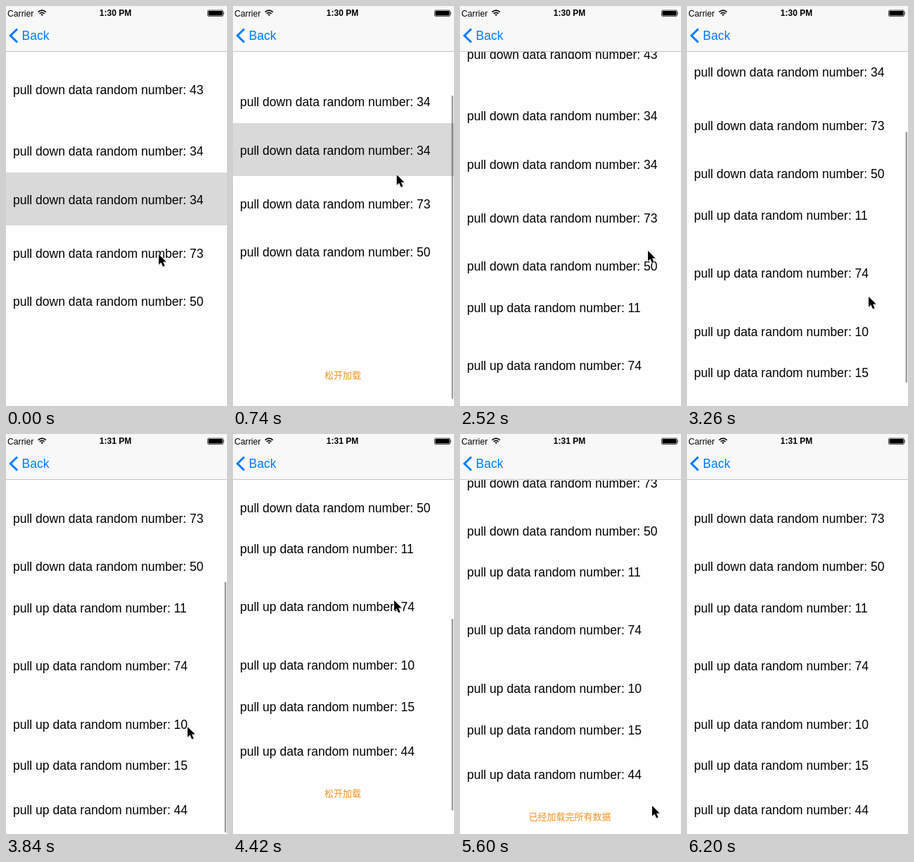
Animation of 314x567 px, one loop 7000 ms. Source, as an HTML page:

```html
<!DOCTYPE html>
<html lang="en">
<head>
<meta charset="utf-8">
<title>Pull to load</title>
<style>
  html, body { margin: 0; width: 100%; height: 100%; overflow: hidden; background: #fefefe; }
  svg { display: block; width: 314px; height: 567px; }
  text { font-family: "Liberation Sans", Arial, sans-serif; font-size: 17.5px; }
  .status { font-size: 12.2px; }
  #clock { font-size: 12px; font-weight: bold; text-anchor: middle; }
  #label { font: 13px "Noto Sans CJK SC", "Noto Sans CJK", sans-serif; fill: #f7931e; text-anchor: middle; }
</style>
</head>
<body>
<svg viewBox="0 0 314 567">
  <g id="list">
    <rect id="selected" y="236" width="314" height="75" fill="#d9d9d9"/>
    <g id="rows"></g>
    <g id="footer">
      <text id="label" x="156" y="5"></text>
      <circle id="spinner" cx="156" cy="0" r="9" fill="none" stroke="#f7931e" stroke-width="1.4" stroke-dasharray="49 8"/>
    </g>
  </g>
  <rect id="bar" x="310.5" width="2.5" rx="1.25" fill="#000" fill-opacity=".38"/>

  <rect width="314" height="64" fill="#f8f8f8"/>
  <rect y="64" width="314" height="1" fill="#c4c4c4"/>
  <text class="status" x="2" y="14.5">Carrier</text>
  <g fill="none" stroke="#000" stroke-width="1.6">
    <path d="M45.6 8.6Q51.2 3.6 56.8 8.6M47.7 10.9Q51.2 7.8 54.7 10.9"/>
    <path d="M49.4 12.2L51.2 14L53 12.2Q51.2 10.6 49.4 12.2Z" fill="#000" stroke="none"/>
  </g>
  <text id="clock" x="155.5" y="14.3"></text>
  <rect x="286.5" y="6" width="22" height="8.5" rx="1.5" fill="none" stroke="#000" stroke-width=".7"/>
  <rect x="287.5" y="7" width="20" height="6.5" rx=".7"/>
  <path d="M309.4 8.6Q311.2 10.2 309.4 11.9Z"/>
  <path d="M16 32.5L6.3 42L16 51.5" fill="none" stroke="#007aff" stroke-width="3"/>
  <text x="22.5" y="48" fill="#007aff">Back</text>

  <g id="cursor">
    <path d="M0 0V14.5L3.4 11.4L6 17.3L8.6 16.2L6.1 10.4H10.6Z" transform="translate(.6 1.4)" fill="#000" opacity=".2"/>
    <path d="M0 0V14.5L3.4 11.4L6 17.3L8.6 16.2L6.1 10.4H10.6Z" stroke="#fff" stroke-width="1.2" paint-order="stroke"/>
  </g>
</svg>
<script>
const LOOP = 7000, TICK = 147.6, VIEW = 567, TRACK_TOP = 65, TRACK = 500;
const RELEASE_1 = 7, LOADED = 17, CLOCK_TURN = 25, RELEASE_2 = 31, DISMISS = 39;

// [row centre, direction, number]
const ROWS = [
  [119, "down", 43], [205.5, "down", 34], [274.5, "down", 34], [351, "down", 73], [419, "down", 50],
  [477.5, "up", 11], [559.5, "up", 74], [642.5, "up", 10], [701, "up", 15], [764, "up", 44]
];

// Tables of [tick, value...]
const SCROLL = [
  [2, 0], [3, 12], [5, 70], [6, 84], [7, 80], [8, 58], [9, 51], [10, 50], [19, 50],
  [20, 68], [21, 120], [22, 181], [23, 212], [24, 226], [25, 231], [27, 231],
  [28, 252], [29, 290], [30, 314.5], [31, 312], [32, 292], [33, 284], [34, 281.5], [38, 281.5],
  [39, 268], [40, 246], [41, 234], [42, 231]
];
const BAR_ALPHA = [[2, 0], [3, 1], [10, 1], [12, 0], [19, 0], [20, 1], [33, 1], [35, 0]];
const CURSOR = [
  [0, 217, 352], [1, 216, 355], [2, 216, 355], [3, 218, 338], [6, 240, 190], [7, 250, 215], [9, 268, 325],
  [13, 268, 325], [17, 267, 347], [19, 267, 347], [20, 264, 300], [21, 258, 330], [22, 258, 412],
  [27, 258, 416], [30, 229, 236], [31, 235, 270], [35, 267, 492], [36, 268, 504], [37, 268, 504],
  [38, 273, 527], [40, 280, 575]
];

const $ = id => document.getElementById(id);
const show = (el, on) => el.setAttribute("visibility", on ? "visible" : "hidden");
const move = (el, x, y) => el.setAttribute("transform", `translate(${x} ${y})`);

const rows = ROWS.map(([y, way, number]) => {
  const row = document.createElementNS("http://www.w3.org/2000/svg", "text");
  row.setAttribute("x", 10);
  row.setAttribute("y", y + 6);
  row.textContent = `pull ${way} data random number: ${number}`;
  $("rows").append(row);
  return row;
});

function at(table, tick, column = 1) {
  const next = table.findIndex(step => step[0] > tick);
  if (next === 0) return table[0][column];
  if (next < 0) return table[table.length - 1][column];
  const a = table[next - 1], b = table[next];
  return a[column] + (b[column] - a[column]) * (tick - a[0]) / (b[0] - a[0]);
}

function footerText(tick, overscroll) {
  if (tick >= RELEASE_2) return "已经加载完所有数据";
  return overscroll > 50 ? "松开加载" : "上拉加载";
}

function draw(tick) {
  const loaded = tick >= LOADED;
  const loading = tick >= RELEASE_1 && !loaded;
  const held = loading || (tick >= RELEASE_2 && tick < DISMISS);
  const bottom = loaded ? 798 : VIEW;
  const scroll = at(SCROLL, tick);

  move($("list"), 0, -scroll);
  show($("selected"), !loaded);
  rows.forEach((row, i) => show(row, loaded || i < 5));

  move($("footer"), 0, bottom + 25.5);
  $("label").textContent = footerText(tick, scroll + VIEW - bottom);
  show($("label"), !loading);
  show($("spinner"), loading);
  $("spinner").setAttribute("transform", `rotate(${60 + (tick - 9) * 53} 156 0)`);

  const size = bottom + (held ? 50 : 0);
  const over = Math.max(0, scroll + VIEW - size);
  const length = VIEW * TRACK / size - over;
  const top = Math.min(TRACK_TOP + scroll * TRACK / size, TRACK_TOP + TRACK - length);
  $("bar").setAttribute("y", top);
  $("bar").setAttribute("height", length);
  $("bar").setAttribute("opacity", at(BAR_ALPHA, tick));

  $("clock").textContent = tick < CLOCK_TURN ? "1:30 PM" : "1:31 PM";
  move($("cursor"), at(CURSOR, tick, 1), at(CURSOR, tick, 2));
}

// The screen refreshes in even ticks, not continuously
const start = performance.now();
function frame(now) {
  const time = Math.max(0, now - start) % LOOP;
  draw(Math.floor((time + 12) / TICK));
  requestAnimationFrame(frame);
}
draw(0);
requestAnimationFrame(frame);
</script>
</body>
</html>
```
